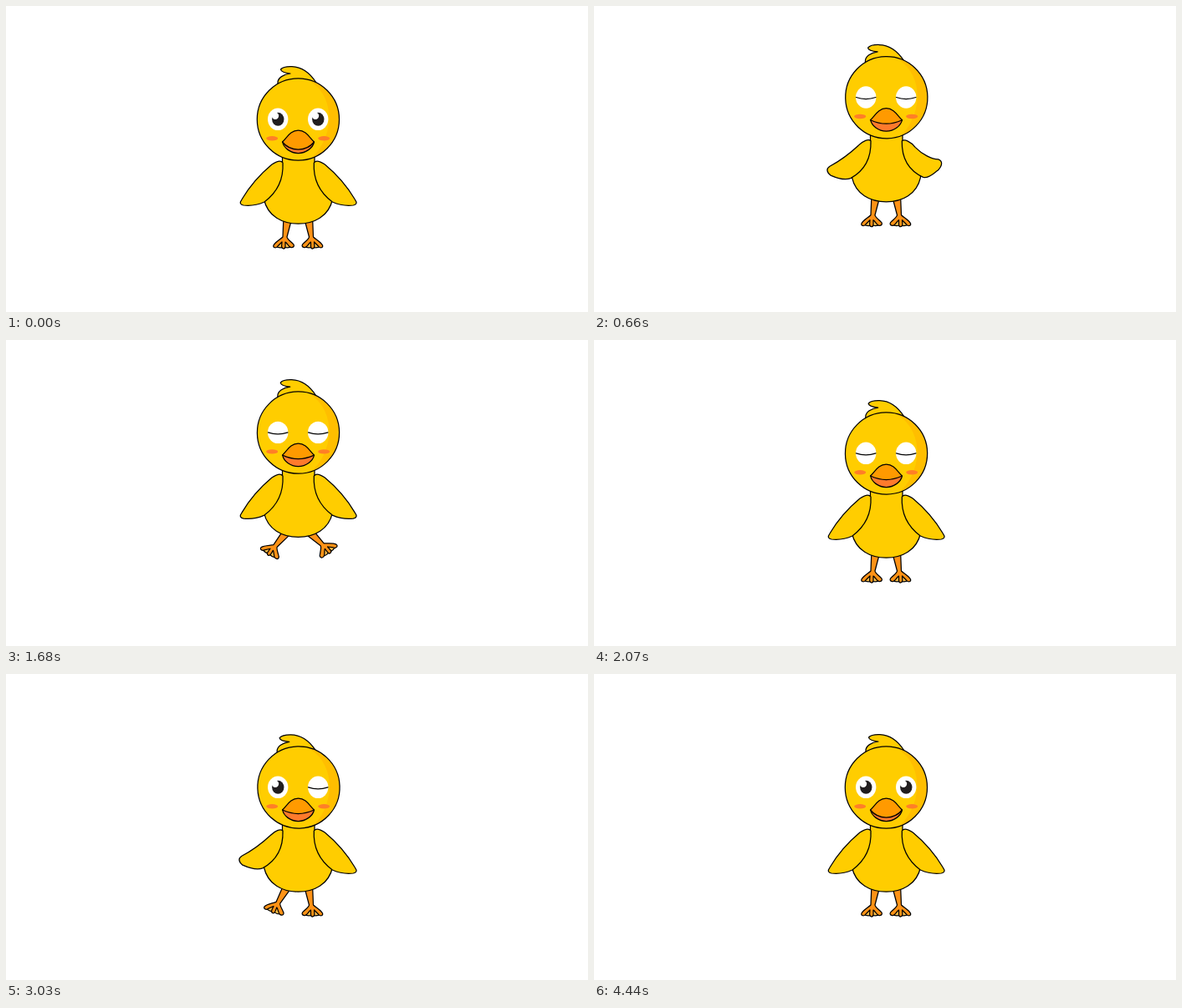
An HTML page for the animation above (4.5 s loop, 696 px wide and 367 px high).

```html
<!DOCTYPE html>
<html lang="en">
<head>
<meta charset="utf-8">
<title>Dancing chick</title>
<style>
  html, body { margin: 0; width: 100%; height: 100%; overflow: hidden; background: #fff; }
  svg { display: block; width: 100vw; height: 100vh; }
  .line { stroke: #000; stroke-width: 1.25; stroke-linejoin: round; stroke-linecap: round; }
  .body { fill: #ffcd00; }
  .shade { fill: #ffbe00; }
  .leg { fill: #ff9216; }
  .web { fill: #ffc04a; }
  .beak { fill: #ff9a00; }
  .mouth { fill: #ff7a2c; }
  .cheek { fill: #ff7f27; }
  .white { fill: #fff; }
  .iris { fill: #211e1f; }
  .lid { fill: none; }
</style>
</head>
<body>
<svg viewBox="0 0 696 367">
  <defs>
    <g id="limb">
      <path class="web line" d="M322 288Q327 291 332 289Q338 291 342 288L334 279Z"/>
      <path class="leg line" d="M332 252L331 277C328 280 322 283 320 287C319 290 323 291 325 288L330 283L329.6 288C330 292 334 292 334 288L334 283C337 285 338 289 341 289.6C345 290 345 286.500 343 285C340 282 336 279 336 277L341 258V252Z"/>
    </g>
    <g id="iris">
      <ellipse class="iris" cx="325.300" cy="135.800" rx="7.200" ry="8"/>
      <circle class="white" cx="322" cy="131.800" r="4.200"/>
    </g>
    <path id="lid" class="lid line" d="M313.500 135.800Q325 140 337 135.800"/>
    <ellipse id="ball" class="white" cx="325.200" cy="135.800" rx="12.200" ry="13.200"/>
  </defs>
  <g id="chick">
    <g id="legL"><use href="#limb"/></g>
    <g transform="matrix(-1 0 0 1 698.5 0)"><g id="legR"><use href="#limb"/></g></g>
    <path class="body line" d="M330.500 178V192C328 208 308 214 308.500 232C313 252 330 261.200 349.500 261.200C369 261.200 386 252 390.500 232C391 214 371 208 369 192V178Z"/>
    <path id="wingL" class="body line"/>
    <path id="wingR" class="body line" transform="matrix(-1 0 0 1 699.3 0)"/>
    <g id="head">
      <path class="body line" d="M325 95V92C325 86 332 82 340 81C335 80.500 329 79.500 328.500 76C331 73 337 72.400 342 72.600C354 73 364 81 371 92Z"/>
      <circle class="body" cx="349.400" cy="136" r="49"/>
      <path class="shade" d="M360 88C392 104 396 152 366 182A49 49 0 0 0 360 88Z"/>
      <circle class="line" fill="none" cx="349.400" cy="136" r="49.100"/>
    </g>
    <use href="#ball"/>
    <use href="#ball" x="48"/>
    <use id="irisL" href="#iris"/>
    <use id="irisR" href="#iris" x="48"/>
    <use id="lidL" href="#lid"/>
    <use id="lidR" href="#lid" x="48"/>
    <ellipse class="cheek" cx="318.200" cy="158.800" rx="7" ry="2.700"/>
    <ellipse class="cheek" cx="380.200" cy="158.800" rx="7" ry="2.700"/>
    <path class="mouth line" d="M330.700 163C332 170 340 176.500 349.500 176.500C359 176.500 367 170 368.500 163Z"/>
    <path id="beak" class="beak line"/>
  </g>
</svg>
<script>
const LOOP = 4500, STEP = 30, BEAT = 1080;
const $ = id => document.getElementById(id);
const set = (id, name, value) => $(id).setAttribute(name, value);

// Wing outline as x, y pairs: lowered and fully raised.
const DOWN = [331,188, 332,206, 325,223, 309,235, 300,239, 292,240, 284,239,
  280,238, 279,236, 282,232, 292,215, 306,200, 318,190, 324,186, 329,185, 331,188];
const UP = [331,188, 331,206, 326,222, 303,229, 300,229, 286,218, 281,211,
  274,201, 275,193, 282,193, 298,206, 307,208, 313,200, 318,191, 327,186, 331,188];
const UP_SHORT = UP.map((v, i) => i % 2 === 0 && v < 290 ? v + 10 : v);

const smooth = x => (1 - Math.cos(Math.PI * Math.min(1, Math.max(0, x)))) / 2;

// Rises from a to b, holds until c, falls back by d.
const bump = (t, a, b, c, d) => smooth((t - a) / (b - a)) * (1 - smooth((t - c) / (d - c)));

function wingPath(up, k) {
  const p = DOWN.map((v, i) => (v + (up[i] - v) * k).toFixed(2));
  return `M${p.slice(0, 2)}C${p.slice(2)}Z`;
}

function beakPath(open) {
  const y = 172 - 4.5 * open;
  return `M330.500 163C336 158 340 149 349.500 149C359 149 363 158 368.500 163` +
    `C363 ${y - 2} 356 ${y} 349.500 ${y}C343 ${y} 336 ${y - 2} 330.500 163Z`;
}

function blink(side, closed) {
  set('iris' + side, 'visibility', closed ? 'hidden' : 'visible');
  set('lid' + side, 'visibility', closed ? 'visible' : 'hidden');
}

function draw(t) {
  const lift = 39 * bump(t, 180, 540, 540, 850) + 25.5 * bump(t, 1080, 1560, 1640, 2050);
  set('chick', 'transform', `translate(0 ${-lift})`);

  const spread = bump(t, 1080, 1560, 1640, 2050);
  const kickL = bump(t, 2180, 2690, 2720, 3240);
  const kickR = bump(t, 3430, 3940, 3960, 4440);
  set('legL', 'transform', `rotate(${32 * spread + 60 * kickL} 337 254)`);
  set('legR', 'transform', `rotate(${38 * spread + 60 * kickR} 337 254)`);

  const flapL = bump(t, 120, 480, 540, 740) + kickL;
  const flapR = bump(t, 120, 480, 540, 800) + bump(t, 3430, 3940, 3960, 4340);
  set('wingL', 'd', wingPath(UP, flapL));
  set('wingR', 'd', wingPath(UP_SHORT, flapR));

  const swing = t > 4 * BEAT ? 0 : t > BEAT && t < 2 * BEAT ? 1 : 2;
  set('head', 'transform', `rotate(${swing * Math.sin(2 * Math.PI * t / BEAT)} 349.400 118)`);

  set('beak', 'd', beakPath(bump(t, 0, 240, 4080, 4320)));
  const asleep = t >= 240 && t < 2160;
  blink('L', asleep);
  blink('R', asleep || (t >= 2700 && t < 3240));
}

const start = performance.now();
function tick() {
  const t = (performance.now() - start) % LOOP;
  draw(Math.min(LOOP - 2 * STEP, Math.floor(t / STEP) * STEP));
  requestAnimationFrame(tick);
}
tick();
</script>
</body>
</html>
```
